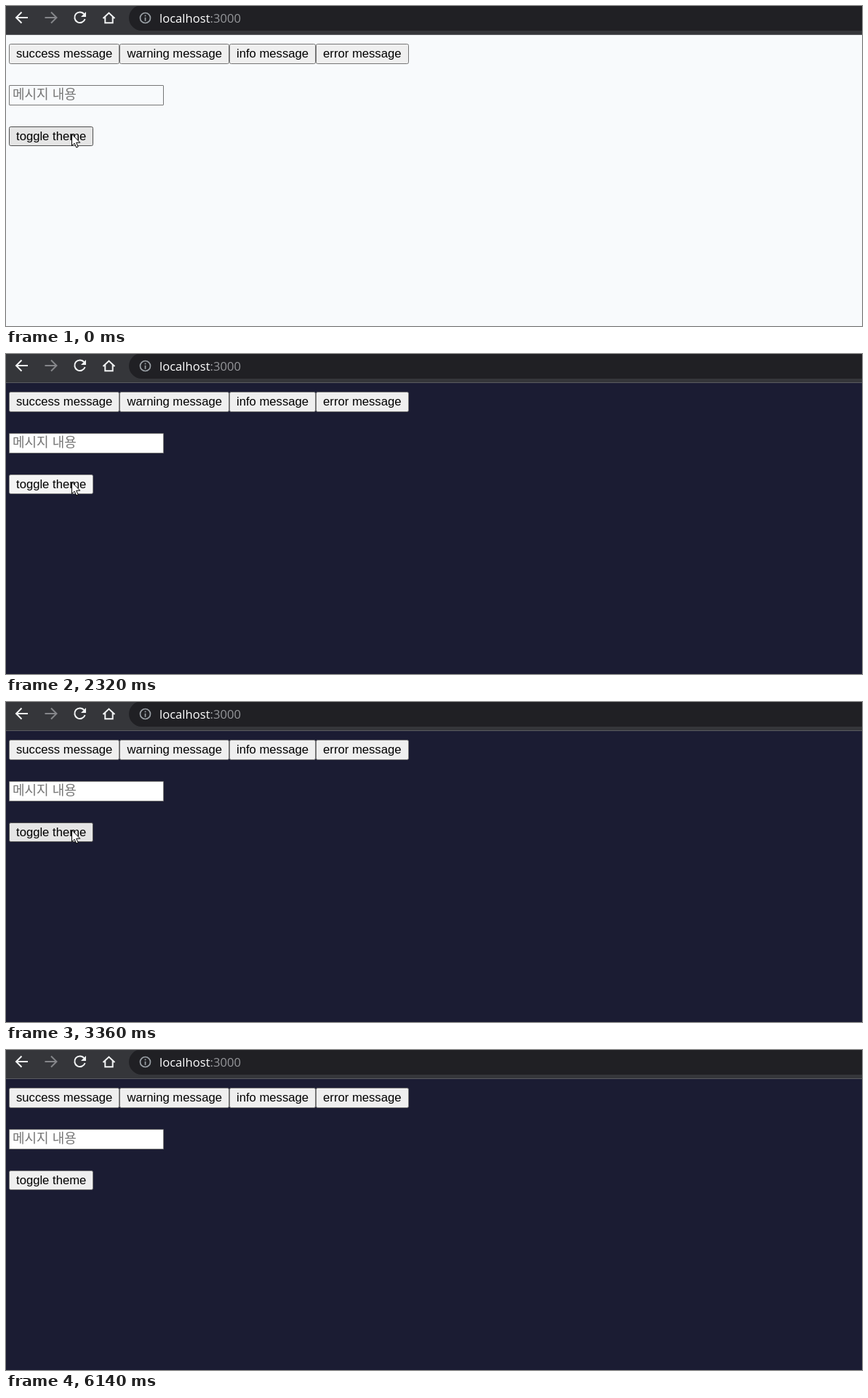
An HTML page that plays this animation: 1177 by 441 pixels, repeating every 7290 ms.

```html
<!DOCTYPE html>
<html lang="ko">
<head>
<meta charset="utf-8">
<title>Theme toggle</title>
<style>
  html, body { margin: 0; width: 100%; height: 100%; overflow: hidden; }
  svg { display: block; }
  .btn { fill: #efefef; stroke: #767676; }
  .btn.hover { fill: #e5e5e5; stroke: #4f4f4f; }
  .btn.press { fill: #f5f5f5; stroke: #8d8d8d; }
  .label { font: 16.667px "Liberation Sans", Arial, sans-serif; fill: #000; }
  .url { font: 16.6px "Open Sans", sans-serif; fill: #fff; }
  .hint { font: 18px "Noto Sans CJK KR", "Noto Sans CJK", sans-serif; fill: #757575; }
  #page { fill: #f8fafc; }
  #field { fill: #f8fafc; stroke: #767676; }
  .dark #page { fill: #1b1c33; }
  .dark #field { fill: #fff; }
</style>
</head>
<body>
<svg id="stage" width="1177" height="441" viewBox="0 0 1177 441">
  <rect id="page" width="1177" height="441"/>

  <rect width="1177" height="40" fill="#35363a"/>
  <rect y="39" width="1177" height="1" fill="#5a5b5f"/>
  <rect x="169" y="-1" width="1040" height="35" rx="17.5" fill="#202024"/>
  <g fill="none" stroke="#f1f3f4" stroke-width="2">
    <path id="arrow" d="M30 16H14.5M21.5 8.5L14 16l7.5 7.500"/>
    <path d="M91 16H75.500M82.500 8.500L75 16l7.500 7.500" transform="matrix(-1 0 0 1 144.500 0)" stroke="#85868a"/>
    <path d="M107.400 11.200A7.300 7.300 0 1 0 108.600 18"/>
    <path d="M133.500 17L141.500 9.500L149.500 17M136.300 15V23.300H146.700V15"/>
  </g>
  <path d="M110 8v7h-7z" fill="#f1f3f4"/>
  <circle cx="191.500" cy="16.500" r="7" fill="none" stroke="#9aa0a6" stroke-width="1.700"/>
  <path d="M190.700 12.500h1.700v1.700h-1.700zM190.700 15.700h1.700v5h-1.700z" fill="#9aa0a6"/>
  <text class="url" x="211" y="23">localhost<tspan fill="#96979b">:3000</tspan></text>

  <g id="buttons"></g>
  <rect id="field" x="4.500" y="109.500" width="212" height="27" rx=".5"/>
  <text class="hint" x="9" y="128">메시지 내용</text>

  <path id="cursor" d="M.5 .7V16.600L4.200 13.200L6.800 19L9.200 18L6.700 12.200H11.800Z" fill="#fff" stroke="#000"/>
</svg>
<script>
const LOOP = 7290, EXIT = 6140;
const stage = document.getElementById('stage');
const cursor = document.getElementById('cursor');
const group = document.getElementById('buttons');

// left, top, right, bottom, text start, label
const buttons = [
  [4, 52, 156, 80, 14, 'success message'],
  [156, 52, 307, 80, 166.4, 'warning message'],
  [307, 52, 426, 80, 317, 'info message'],
  [426, 52, 554, 80, 436.1, 'error message'],
  [4, 166, 120, 193, 14, 'toggle theme']
].map(([l, t, r, b, x, label]) => {
  const box = add('rect', { x: l + .5, y: t + .5, width: r - l - 1, height: b - t - 1, rx: 2 });
  add('text', { class: 'label', x, y: t + 19 }).textContent = label;
  return { box, holds: (px, py) => px >= l && px < r && py >= t && py < b };
});

const presses = [[1150, 1190], [2320, 2410], [3240, 3360], [4540, 4650], [5100, 5200], [5370, 5470]];
const toggles = [1190, 2410, 3360];

const smooth = u => u * u * (3 - 2 * u);
const leave = u => u ** 1.3;

// start, end, steps, destination, easing
const moves = [
  [3910, 4540, 10, 250, 60, smooth],
  [4650, 4890, 4, 440, 60, smooth],
  [4890, 5100, 4, 397, 60, smooth],
  [5470, EXIT, 11, 1215, 453, leave]
];

function add(name, attrs) {
  const el = document.createElementNS('http://www.w3.org/2000/svg', name);
  for (const key in attrs) el.setAttribute(key, attrs[key]);
  return group.appendChild(el);
}

function cursorAt(t) {
  let x = 90, y = 176;
  for (const [start, end, steps, toX, toY, ease] of moves) {
    if (t < start) break;
    const step = Math.floor((t - start) / (end - start) * steps) + 1;
    const k = ease(Math.min(1, step / steps));
    x += (toX - x) * k;
    y += (toY - y) * k;
  }
  return [Math.round(x), Math.round(y)];
}

function draw() {
  const t = (performance.now() - begin) % LOOP;
  const [x, y] = cursorAt(t);
  const pressed = presses.some(([from, to]) => t >= from && t < to);
  const dark = toggles.filter(at => t >= at).length % 2;

  stage.setAttribute('class', dark ? 'dark' : '');
  for (const { box, holds } of buttons) {
    const state = !holds(x, y) ? '' : pressed ? ' press' : ' hover';
    box.setAttribute('class', 'btn' + state);
  }
  cursor.setAttribute('transform', `translate(${x} ${y})`);
  cursor.style.display = t < EXIT ? '' : 'none';
  requestAnimationFrame(draw);
}

const begin = performance.now();
draw();
</script>
</body>
</html>
```
